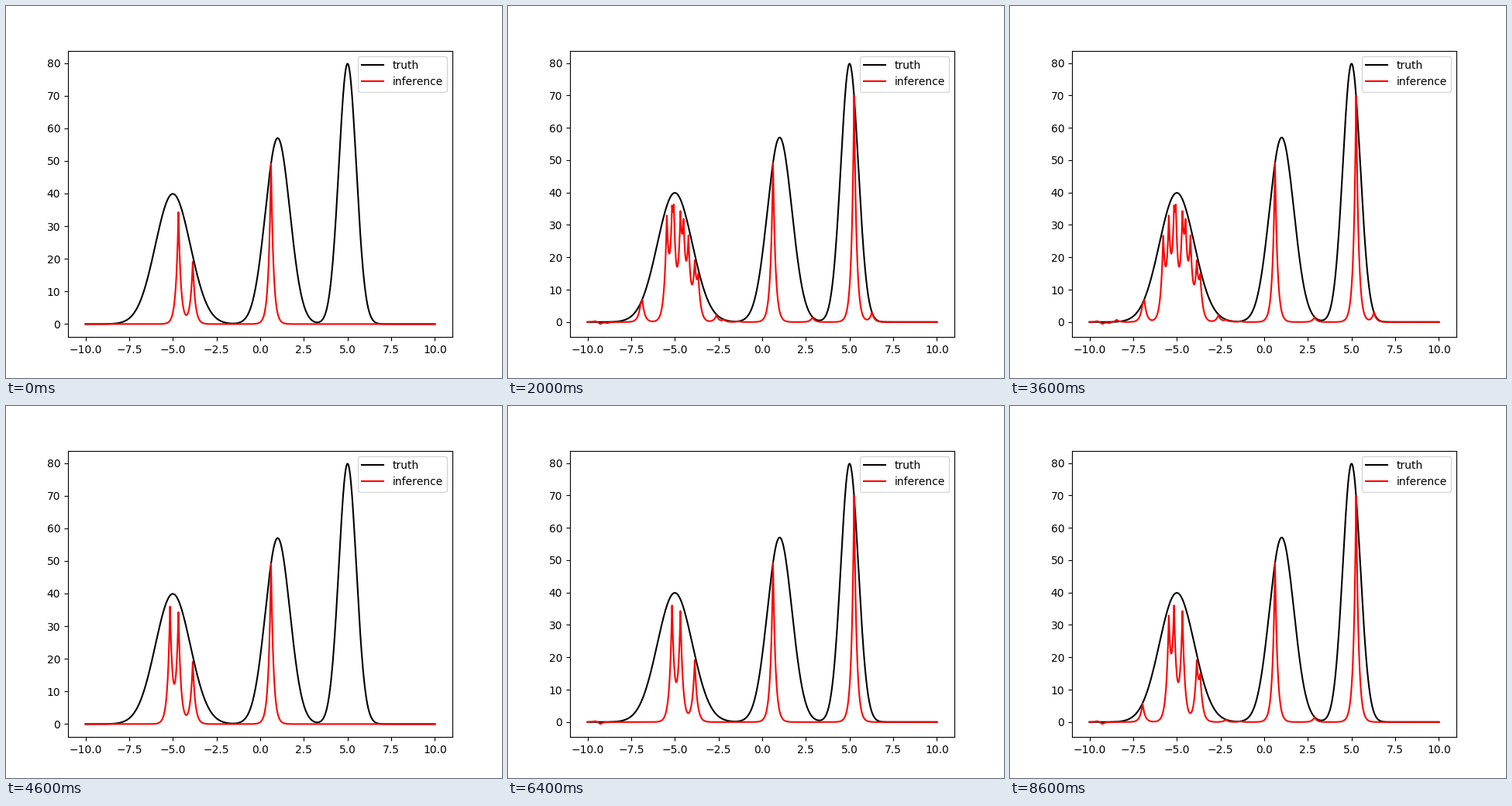
These frames come from a looping animation (640x480 px, 8800 ms). A matplotlib script:

```python
import numpy as np
import matplotlib.pyplot as plt
from matplotlib.animation import FuncAnimation

plt.rcParams["text.kerning_factor"] = 6

LENGTH_SCALE = 0.14
STEP, LAST = 5, 215

# Sampled positions in order of arrival, then a few more around the left hump
visited = [-4.68, -3.86, 0.62, -5.16, 5.26, -9.56, -9.26, -6.96,
           -5.46, -2.20, -3.66, 2.88, -1.36, -8.86, -4.50,
           -4.22, 6.28, -2.62, -6.86, -5.06, -1.90, -8.44]
later = np.random.default_rng(4).normal(-5, 1.2, 4).round(2)
sites = np.concatenate([visited, later])

xs = np.linspace(-10, 10, 1001)


def hump(x, mean, sd):
    return 100 * np.exp(-0.5 * ((x - mean) / sd) ** 2) / (sd * np.sqrt(2 * np.pi))


def mixture(x, left_weight=1.0):
    return left_weight * hump(x, -5, 1) + hump(x, 1, 0.7) + hump(x, 5, 0.5)


def observed(x):
    """Slightly low on the left hump, with an error that grows outwards."""
    error = -0.93 * (x / 10) ** 2 * np.cos(2 * np.pi * (x + 9.1) / 1.5)
    return mixture(x, left_weight=0.91) + error


def kernel(a, b):
    return np.exp(-np.abs(a[:, None] - b[None, :]) / LENGTH_SCALE)


def sample_count(iteration):
    return int(np.interp(iteration, [0, 20, 25, 60, 95, 115, 150, LAST],
                         [3, 4, 6, 8, 13, 15, 22, len(sites)]))


def inference(iteration):
    """Mean of a Gaussian process through the samples taken so far."""
    px = sites[:sample_count(iteration)]
    return kernel(xs, px) @ np.linalg.solve(kernel(px, px), observed(px))


fig, ax = plt.subplots(figsize=(6.4, 4.8), dpi=100)
ax.plot(xs, mixture(xs), color="black", label="truth")
curve, = ax.plot(xs, inference(0), color="red", label="inference")
ax.legend(loc="upper right")

# Iterations play in alphabetical order: 0, 10, 100, 105, ...
order = sorted(range(0, LAST + STEP, STEP), key=str)


def update(frame):
    curve.set_ydata(inference(order[frame]))
    ax.relim()
    ax.autoscale_view()
    return curve,


anim = FuncAnimation(fig, update, frames=len(order), interval=200,
                     repeat=True, repeat_delay=0, blit=False)
plt.show()
```
